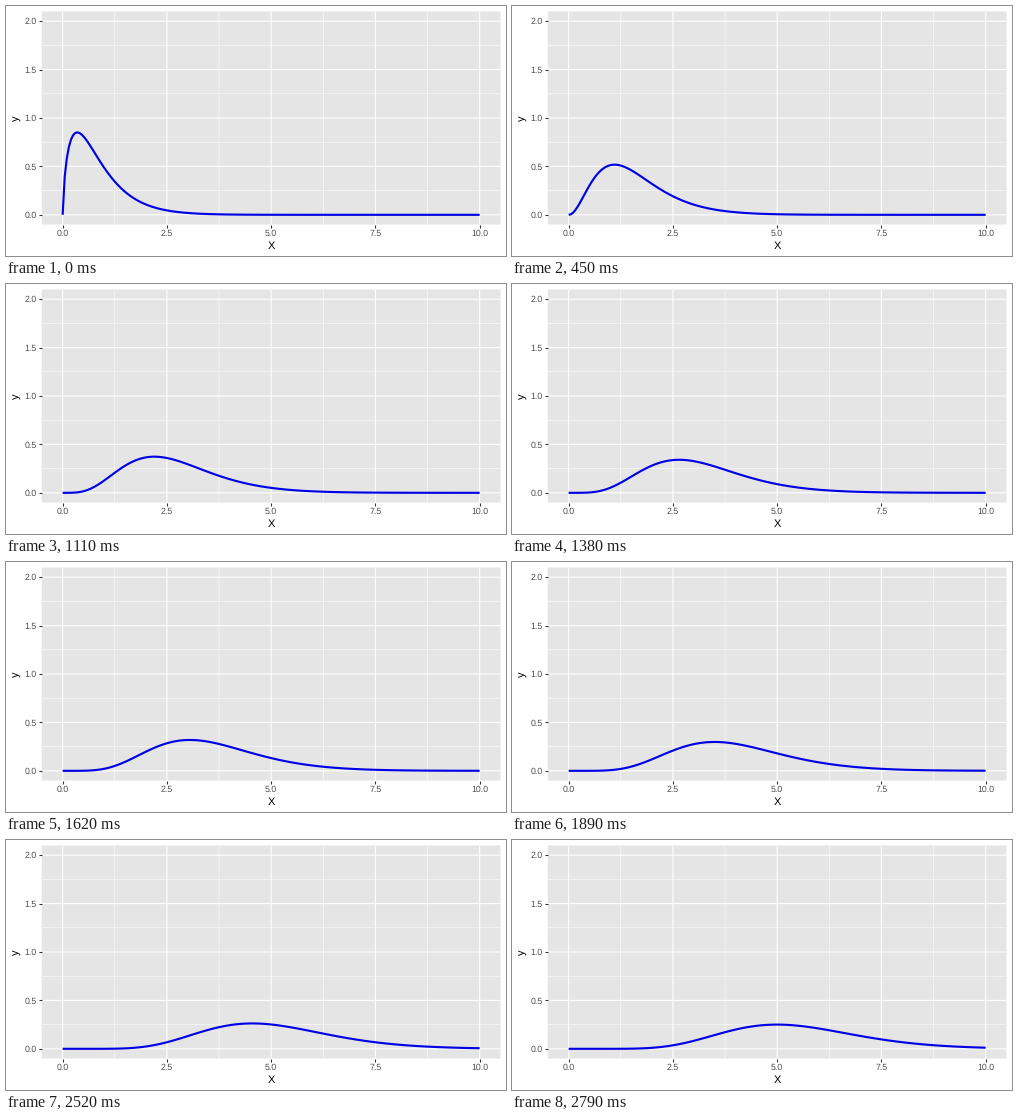
A matplotlib script for the animation above (3.12 s loop, 500 by 250 pixels).

```python
import math

import matplotlib.pyplot as plt
import numpy as np
from matplotlib.animation import FuncAnimation

W, H = 500, 250
LEFT, RIGHT, TOP, BOTTOM = 35.8, 494.5, 5.5, 218.5
FRAMES, STEPS, INTERVAL = 104, 93, 30
RATE, FIRST_SHAPE, SHAPE_STEP = 2, 1.7, 0.1

plt.rcParams.update({
    "font.family": "Liberation Sans",
    "text.hinting": "none",
    "path.snap": False,
    "path.simplify": False,
    "toolbar": "None",
})

fig = plt.figure(figsize=(W / 72, H / 72), dpi=72, facecolor="white")
ax = fig.add_axes([LEFT / W, 1 - BOTTOM / H,
                   (RIGHT - LEFT) / W, (BOTTOM - TOP) / H])
ax.set(xlim=(-0.5, 10.5), ylim=(-0.1, 2.1), facecolor="#e5e5e5")
ax.set_axisbelow(True)
for spine in ax.spines.values():
    spine.set_visible(False)

x_ticks = np.arange(0, 10.1, 2.5)
y_ticks = np.arange(0, 2.1, 0.5)
ax.set_xticks(x_ticks)
ax.set_yticks(y_ticks)
ax.set_xticks(x_ticks[:-1] + 1.25, minor=True)
ax.set_yticks(y_ticks[:-1] + 0.25, minor=True)
ax.tick_params(which="major", length=2.75, width=1.07, color="#333333",
               labelbottom=False, labelleft=False)
ax.tick_params(which="minor", length=0)
ax.grid(which="major", color="white", lw=1.07)
ax.grid(which="minor", color="white", lw=0.53)


def label(x, y, text, size=8.8, color="#4d4d4d", **kw):
    """Place text with its baseline at stage pixel (x, y)."""
    kw = {"ha": "center", "va": "baseline", **kw}
    fig.text(x / W, 1 - y / H, text, fontsize=size, color=color, **kw)


for t in x_ticks:
    label(LEFT + (t + 0.5) / 11 * (RIGHT - LEFT), 230, f"{t:.1f}")
for t in y_ticks:
    y = BOTTOM - (t + 0.1) / 2.2 * (BOTTOM - TOP)
    label(31, y + 3.2, f"{t:.1f}", ha="right")
label(265.2, 243, "X", 11, "black")
label(11, 112, "y", 11, "black", va="center", rotation=90)

xs = np.linspace(0, 10, 201)
curve, = ax.plot([], [], color="#0000e5", lw=2.13,
                 solid_capstyle="butt", solid_joinstyle="round")


def gamma_pdf(x, shape):
    return (RATE ** shape * x ** (shape - 1) * np.exp(-RATE * x)
            / math.gamma(shape))


def update(i):
    shape = FIRST_SHAPE + SHAPE_STEP * min(i, STEPS)
    curve.set_data(xs, gamma_pdf(xs, shape))
    return curve,


anim = FuncAnimation(fig, update, frames=FRAMES, interval=INTERVAL,
                     repeat=True, repeat_delay=0)
plt.show()
```
